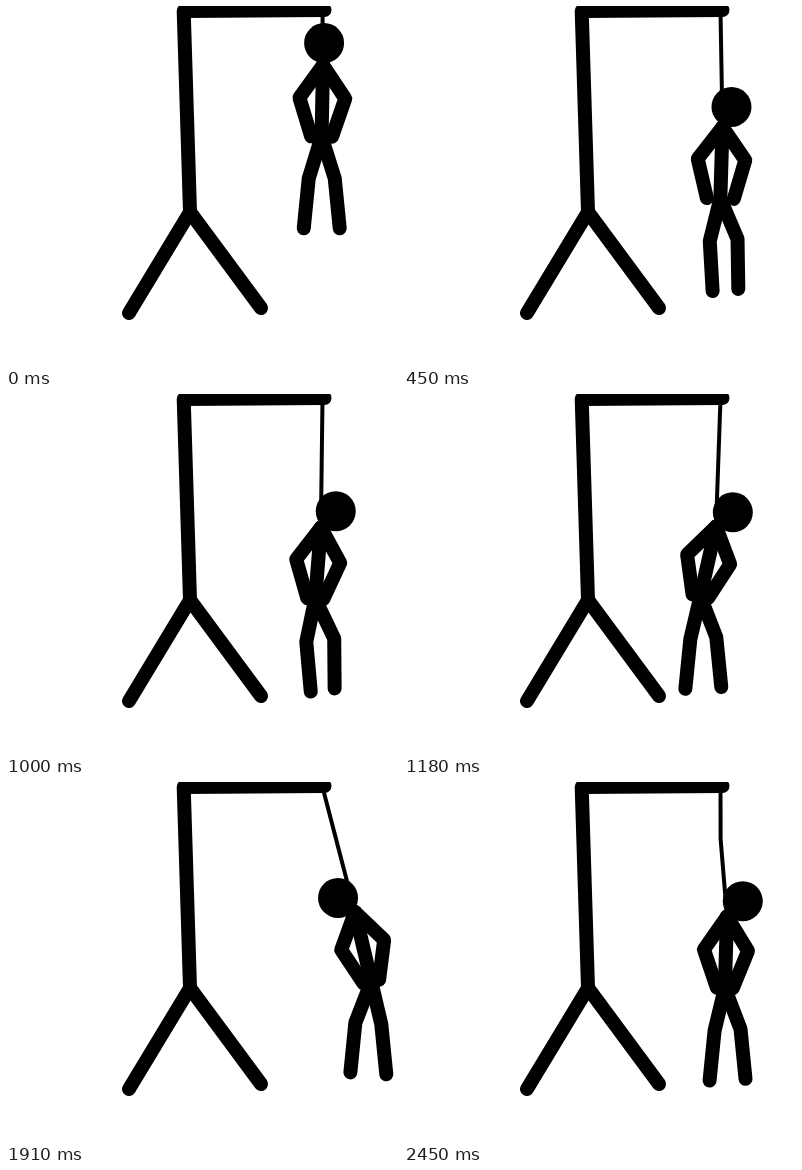
An HTML page with a canvas for the animation above (2.54 s loop, 392 by 360 pixels).

```html
<!DOCTYPE html>
<html lang="en">
<head>
<meta charset="utf-8">
<title>Stick figure</title>
<style>
  html, body { margin: 0; width: 100%; height: 100%; overflow: hidden; background: #fff; }
  canvas { display: block; }
</style>
</head>
<body>
<canvas id="stage" width="392" height="360"></canvas>
<script>
const ctx = document.getElementById('stage').getContext('2d');
const LOOP = 2540, STEP = 90, LIMB = 14, ROPE = 4;
const HEAD_RADIUS = 20, NECK = 22, TORSO = 71.5, ARM = 40.3, THIGH = 44, SHIN = 50;

// x, y: neck; lean: torso angle; tilt: head angle; kick: bent legs;
// grip: distance of each hand from the hip; slack: sideways bend of the rope.
const pose = (x, y, lean, tilt, more) =>
  ({ x, y, lean, tilt, kick: 0, grip: 8, slack: 0, ...more });

const high  = pose(317, 59, -0.02, 0.05, { grip: 10.5 });
const fall  = pose(318.5, 121, -0.03, 0.42, { kick: 0.55, grip: 13.5 });
const sag   = pose(316.5, 134, 0, 0.67, { kick: 1 });
const left  = pose(312, 132.5, -0.22, 0.87);
const back  = pose(321, 134, -0.2, 0.44);
const right = pose(349, 130, 0.23, -0.88);
const rest  = pose(323, 134.5, -0.03, 0.8, { slack: -2.5 });

const linear = u => u, easeIn = u => u * u;
const key = (step, pose, ease = linear) => ({ step, pose, ease });
const keys = [
  key(0, high), key(5, fall), key(7, { ...sag, x: 319, y: 141 }), key(8, sag),
  key(13, left, easeIn), key(14, left), key(16, back),
  key(20, right), key(21, { ...right, y: 138 }), key(26, rest)
];

const mix = (a, b, u) => a + (b - a) * u;
const hold = (t, at, length) => t < at ? t : Math.max(at, t - length);

// Two steps last longer than the others.
const stepAt = t => Math.floor(hold(hold(t, 450, 10), 1350, 100) / STEP);

function poseAt(step) {
  const i = Math.max(1, keys.findIndex(k => k.step >= step));
  const a = keys[i - 1], b = keys[i];
  const u = b.ease((step - a.step) / (b.step - a.step));
  const result = {};
  for (const name in a.pose) result[name] = mix(a.pose[name], b.pose[name], u);
  return result;
}

// Angles are measured from straight down, positive to the right.
const bone = ([x, y], length, angle) =>
  [x + length * Math.sin(angle), y + length * Math.cos(angle)];

// Middle joint of an arm with two equal bones, bent outwards.
function elbow(shoulder, hand, side) {
  const dx = hand[0] - shoulder[0], dy = hand[1] - shoulder[1];
  const reach = Math.hypot(dx, dy);
  const bend = side * Math.sqrt(Math.max(0, ARM * ARM - reach * reach / 4)) / reach;
  return [shoulder[0] + dx / 2 + dy * bend, shoulder[1] + dy / 2 - dx * bend];
}

function line(width, ...points) {
  ctx.lineWidth = width;
  ctx.beginPath();
  points.forEach(p => ctx.lineTo(...p));
  ctx.stroke();
}

function drawGallows() {
  const fork = [184, 206];
  line(LIMB, [318.5, 4], [177.7, 5], fork, [123, 307]);
  line(LIMB, fork, [255, 302]);
}

function drawFigure({ x, y, lean, tilt, kick, grip, slack }) {
  const neck = [x, y], hook = [316.5, 5];
  const hip = bone(neck, TORSO, lean);
  const head = bone(neck, -NECK, -tilt);
  const twist = kick * kick;

  line(ROPE, hook, [mix(hook[0], x, 0.4) + slack, mix(hook[1], y, 0.4)], neck);
  line(LIMB, neck, hip);
  for (const side of [-1, 1]) {
    const hand = bone(hip, side * grip, lean + Math.PI / 2);
    line(LIMB, neck, elbow(neck, hand, side), hand);

    const knee = bone(hip, THIGH, 0.08 * tilt + 0.15 * twist + side * (0.3 + 0.04 * kick));
    const foot = bone(knee, SHIN, 0.12 * twist + side * (0.1 - 0.22 * kick));
    line(LIMB, hip, knee, foot);
  }
  ctx.beginPath();
  ctx.arc(...head, HEAD_RADIUS, 0, Math.PI * 2);
  ctx.fill();
}

function draw(time) {
  ctx.fillStyle = '#fff';
  ctx.fillRect(0, 0, 392, 360);
  ctx.fillStyle = ctx.strokeStyle = '#000';
  ctx.lineCap = ctx.lineJoin = 'round';
  drawGallows();
  drawFigure(poseAt(stepAt(time % LOOP)));
}

const start = performance.now();
function tick() {
  draw(performance.now() - start);
  requestAnimationFrame(tick);
}
tick();
</script>
</body>
</html>
```
